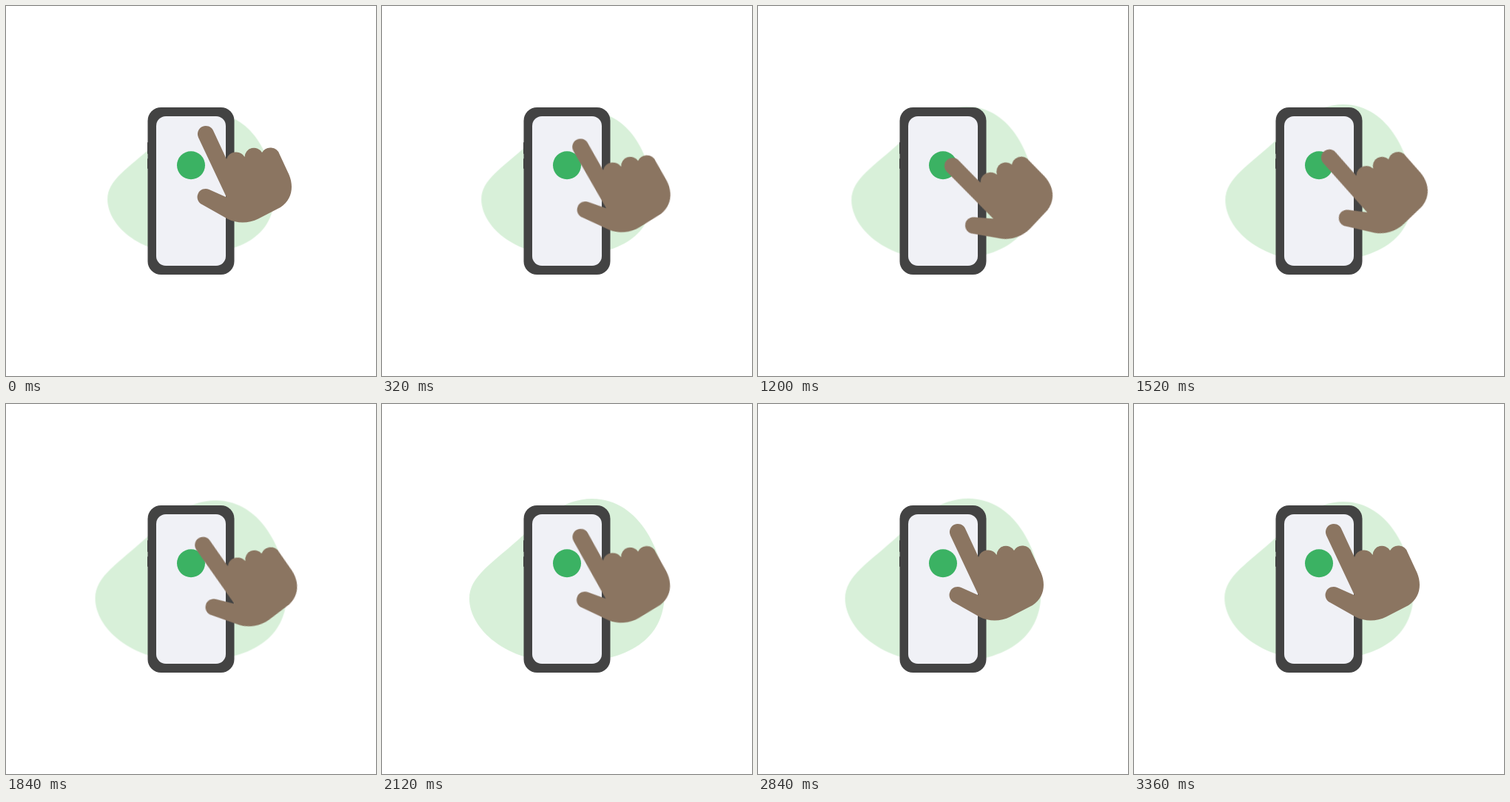
Animation of 500x500 px, one loop 3400 ms. Source, as an HTML page:

```html
<!DOCTYPE html>
<html lang="en">
<head>
<meta charset="utf-8">
<title>Tap on a phone</title>
<style>
  html, body { margin: 0; width: 100%; height: 100%; overflow: hidden; background: #fff; }
  svg { display: block; width: 100vw; height: 100vh; }

  .blob, .reach, .wrist { animation: 3.4s linear infinite; }
  .blob { transform-origin: 250px 250px; animation-name: breathe; }
  .reach { animation-name: reach; }
  .wrist { transform-origin: 276px 195px; animation-name: turn; }

  /* The growth cycle is longer than the loop, so it cuts back at the end. */
  @keyframes breathe {
    0% { transform: scale(1); }
    73.53% { transform: scale(1.2); }
    100% { transform: scale(1.128); }
  }
  @keyframes reach {
    0% { transform: translateY(0); animation-timing-function: cubic-bezier(.3, 0, .5, 1); }
    26.5% { transform: translateY(44px); animation-timing-function: cubic-bezier(.33, 0, .67, 1); }
    73.53%, 100% { transform: translateY(0); }
  }
  @keyframes turn {
    0% { transform: rotate(0deg); animation-timing-function: cubic-bezier(.3, 0, .5, 1); }
    35.3% { transform: rotate(-19.5deg); animation-timing-function: cubic-bezier(.33, 0, .67, 1); }
    73.53%, 100% { transform: rotate(0deg); }
  }
</style>
</head>
<body>
<svg viewBox="0 0 500 500">
  <g class="blob">
    <path fill="#d8f0d9" transform="translate(250 250) scale(.8547) translate(-250 -250)"
      d="M118 263C118 232 150 215 191 177C215 155 245 128 284 128C350 128 382 205 382 255
         C382 310 345 348 250 350C165 350 118 302 118 263Z"/>
  </g>

  <g fill="#434343">
    <rect x="191" y="184" width="3" height="16" rx="1"/>
    <rect x="191" y="206" width="3" height="14" rx="1"/>
    <rect x="191.5" y="136.9" width="117" height="226.2" rx="18"/>
  </g>
  <rect x="203" y="149" width="94" height="202" rx="13" fill="#f0f1f6"/>
  <circle cx="250" cy="215.2" r="19" fill="#3bb263"/>

  <g class="reach">
    <path class="wrist" fill="#8b7561"
      d="M260 177.7A11 11 0 0 1 280 168.3L298 207
         A13.5 13.5 0 0 1 322.5 204A12.6 12.6 0 0 1 346 198A13 13 0 0 1 369.5 200
         L382.5 228C389 243 387 262 371 272L341 287.5C328 294 312 294 300 288
         L265 268.3A11 11 0 0 1 274.5 248L298 258.5Z"/>
  </g>
</svg>
</body>
</html>
```
